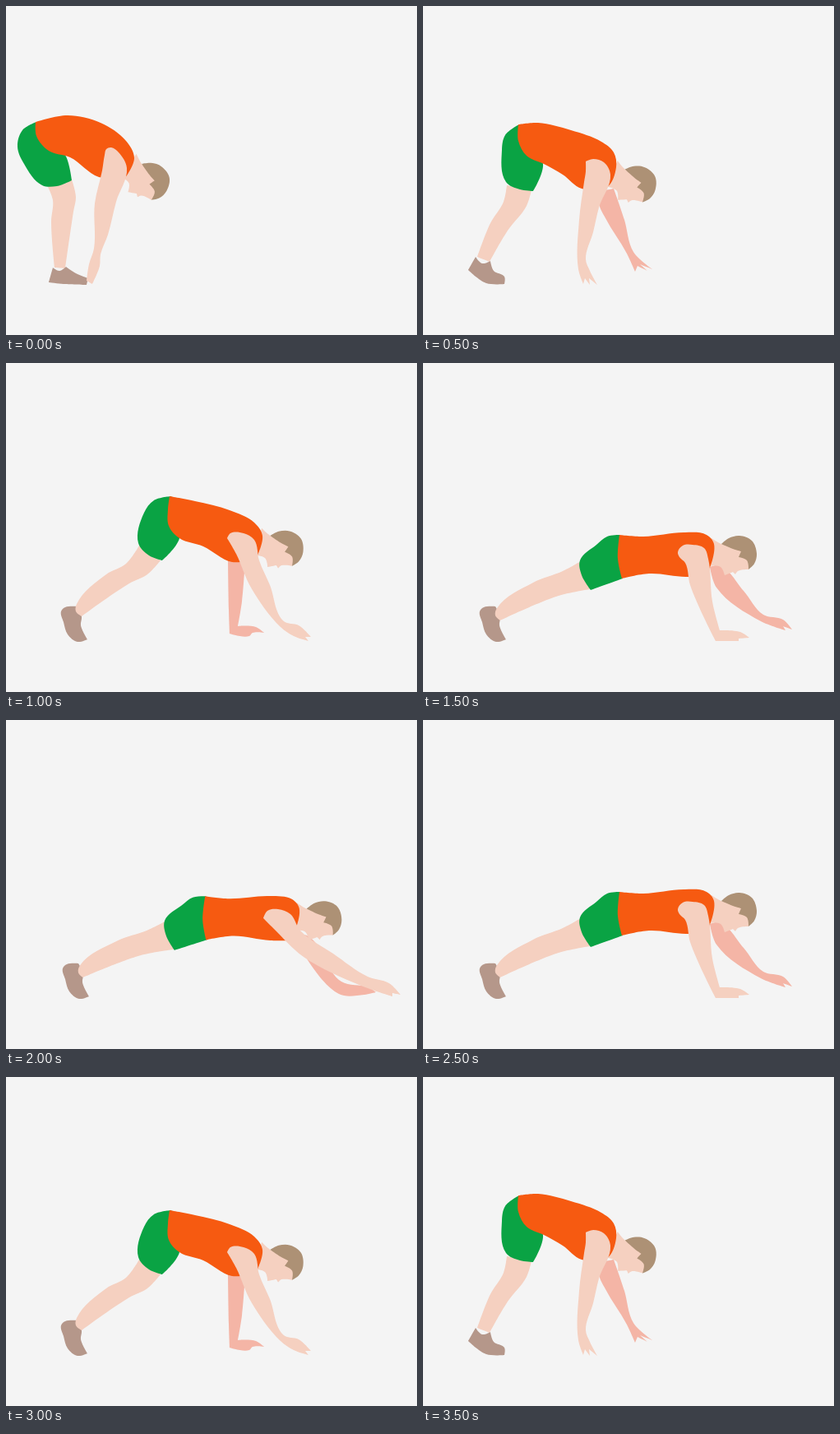
Recreate the animation shown at these times as an HTML page with a canvas. Size 500x400 px, loop 4000 ms.

```html
<!DOCTYPE html>
<html lang="en">
<head>
<meta charset="utf-8">
<title>Walkout exercise</title>
<style>
  html, body { margin: 0; overflow: hidden; background: #f4f4f4; }
  canvas { display: block; }
</style>
</head>
<body>
<canvas id="stage" width="500" height="400"></canvas>
<script>
const ctx = document.getElementById('stage').getContext('2d');
const SKIN = '#f5d0c0', FAR_SKIN = '#f4b5a6', SHIRT = '#f65a11';
const SHORTS = '#0aa344', HAIR = '#ad9175', SHOE = '#b5978a';
const STEP = 500;

const unit = (x, y) => [x / Math.hypot(x, y), y / Math.hypot(x, y)];

// Closed smooth outline through the points; sharp turns stay corners.
function blob(color, ...coords) {
  const count = coords.length / 2;
  const at = i => {
    const k = (i + count) % count * 2;
    return [coords[k], coords[k + 1]];
  };
  const tangent = i => {
    const [a, b, c] = [at(i - 1), at(i), at(i + 1)];
    const u = unit(b[0] - a[0], b[1] - a[1]);
    const v = unit(c[0] - b[0], c[1] - b[1]);
    const smooth = u[0] * v[0] + u[1] * v[1] > 0.45;
    return smooth ? unit(u[0] + v[0], u[1] + v[1]) : [0, 0];
  };
  ctx.beginPath();
  ctx.moveTo(...at(0));
  for (let i = 0; i < count; i++) {
    const [p, q, t, s] = [at(i), at(i + 1), tangent(i), tangent(i + 1)];
    const d = Math.hypot(q[0] - p[0], q[1] - p[1]) / 3;
    ctx.bezierCurveTo(p[0] + t[0] * d, p[1] + t[1] * d, q[0] - s[0] * d, q[1] - s[1] * d, ...q);
  }
  ctx.fillStyle = color;
  ctx.fill();
}

function turned(x, y, degrees, paint) {
  ctx.save();
  ctx.translate(x, y);
  ctx.rotate(degrees * Math.PI / 180);
  paint();
  ctx.restore();
}

function head() {
  blob(SKIN, -34,-18, -22,-11, 0,-8, 12,8, 11,20, -2,22, -5,26, -8,23, -18,27, -23,17, -36,16);
  blob(HAIR, -22,-11, -13,-18, 0,-21, 15,-15, 21,1, 18,13, 11,20, 9,9, -1,5, 2,-2, -8,-5);
}

function raisedShoe() {
  blob(SHOE, 88,296, 74,297, 69,302, 72,315, 77,330, 89,339, 101,336, 93,319, 94,308);
}

function standing() {
  turned(178, 213, 32, head);
  blob(SKIN, 50,218, 57,236, 55,262, 59,318, 72,319, 82,250, 85,232, 79,208);
  blob(SHOE, 57,318, 52,336, 70,338, 98,339, 100,331, 85,325, 73,317, 65,322);
  blob(SHORTS, 37,141, 20,151, 14,171, 22,192, 44,218, 62,219, 80,212, 73,183);
  blob(SHIRT, 36,141, 75,133, 115,142, 146,164, 156,185, 145,209, 113,208, 78,184, 52,176, 37,158);
  blob(SKIN, 120,181, 122,174, 128,172, 137,178, 147,197, 134,238, 124,278, 115,302,
    114,316, 105,338, 98,334, 101,314, 107,295, 108,240, 117,200);
}

function handsDown() {
  blob(FAR_SKIN, 216,225, 232,222, 245,260, 256,299, 279,320, 264,314, 273,322,
    261,316, 258,323, 248,301, 222,258, 214,240);
  turned(263, 216, 19, head);
  blob(SKIN, 102,218, 98,238, 82,264, 66,305, 81,311, 103,273, 126,243, 132,224);
  blob(SHOE, 64,305, 55,321, 77,337, 99,338, 99,329, 86,322, 82,310, 72,313);
  blob(SHORTS, 117,144, 100,157, 96,175, 101,214, 118,223, 134,225, 146,192);
  blob(SHIRT, 116,144, 140,142, 180,151, 217,165, 232,178, 235,196, 223,221, 193,222,
    170,205, 147,192, 126,182, 116,164);
  blob(SKIN, 198,201, 198,189, 207,186, 220,190, 228,205, 214,245, 207,275, 198,308,
    203,322, 212,339, 202,331, 203,339, 197,331, 195,338, 189,320, 190,260, 196,214);
}

function walking() {
  blob(FAR_SKIN, 270,238, 291,240, 287,290, 282,320, 304,321, 314,328, 300,328, 296,332, 272,329, 271,300);
  turned(341, 225, 11, head);
  turned(-2, 0, 0, raisedShoe);
  blob(SKIN, 162,222, 146,244, 122,257, 86,293, 85,302, 92,308, 150,268, 172,257, 188,240);
  blob(SHORTS, 201,162, 180,167, 168,182, 161,219, 174,234, 190,240, 211,213);
  blob(SHIRT, 199,162, 230,168, 272,179, 302,194, 312,210, 304,238, 275,242, 240,223, 211,213, 198,198, 197,178);
  blob(SKIN, 269,213, 273,207, 289,207, 302,215, 308,240, 321,270, 338,314, 356,319,
    371,333, 364,333, 368,338, 350,332, 334,321, 298,273, 280,232);
}

function flatBody() {
  turned(385, 231, 0, head);
  blob(SKIN, 192,241, 170,253, 134,267, 90,298, 88,307, 94,313, 165,283, 203,275);
  blob(SHORTS, 240,209, 224,211, 211,221, 191,240, 193,258, 204,276, 243,262);
  blob(SHIRT, 239,209, 268,211, 318,206, 345,209, 354,220, 345,259, 320,260, 275,256, 242,262, 237,238);
}

function reaching() {
  blob(FAR_SKIN, 349,248, 360,246, 390,277, 414,306, 438,312, 449,324, 438,320, 441,325, 411,314, 357,273);
  raisedShoe();
  flatBody();
  blob(SKIN, 310,230, 316,222, 328,221, 342,225, 347,238, 352,290, 361,325, 386,327,
    397,334, 384,335, 384,338, 356,338, 325,270, 319,243, 312,236);
}

function plank() {
  blob(FAR_SKIN, 350,262, 366,262, 408,318, 441,325, 450,331, 436,334, 405,333);
  raisedShoe();
  turned(91, 305, 2, () => {
    ctx.translate(-91, -305);
    flatBody();
  });
  blob(SKIN, 313,241, 318,232, 331,230, 346,236, 358,256, 398,284, 440,312, 466,320,
    480,334, 470,332, 470,336, 432,323, 362,288, 325,253);
}

const sequence = [standing, handsDown, walking, reaching, plank, reaching, walking, handsDown];
const start = performance.now();

function draw(now) {
  const step = Math.floor(Math.max(0, now - start) / STEP) % sequence.length;
  ctx.fillStyle = '#f4f4f4';
  ctx.fillRect(0, 0, 500, 400);
  sequence[step]();
  requestAnimationFrame(draw);
}
draw(start);
</script>
</body>
</html>
```
